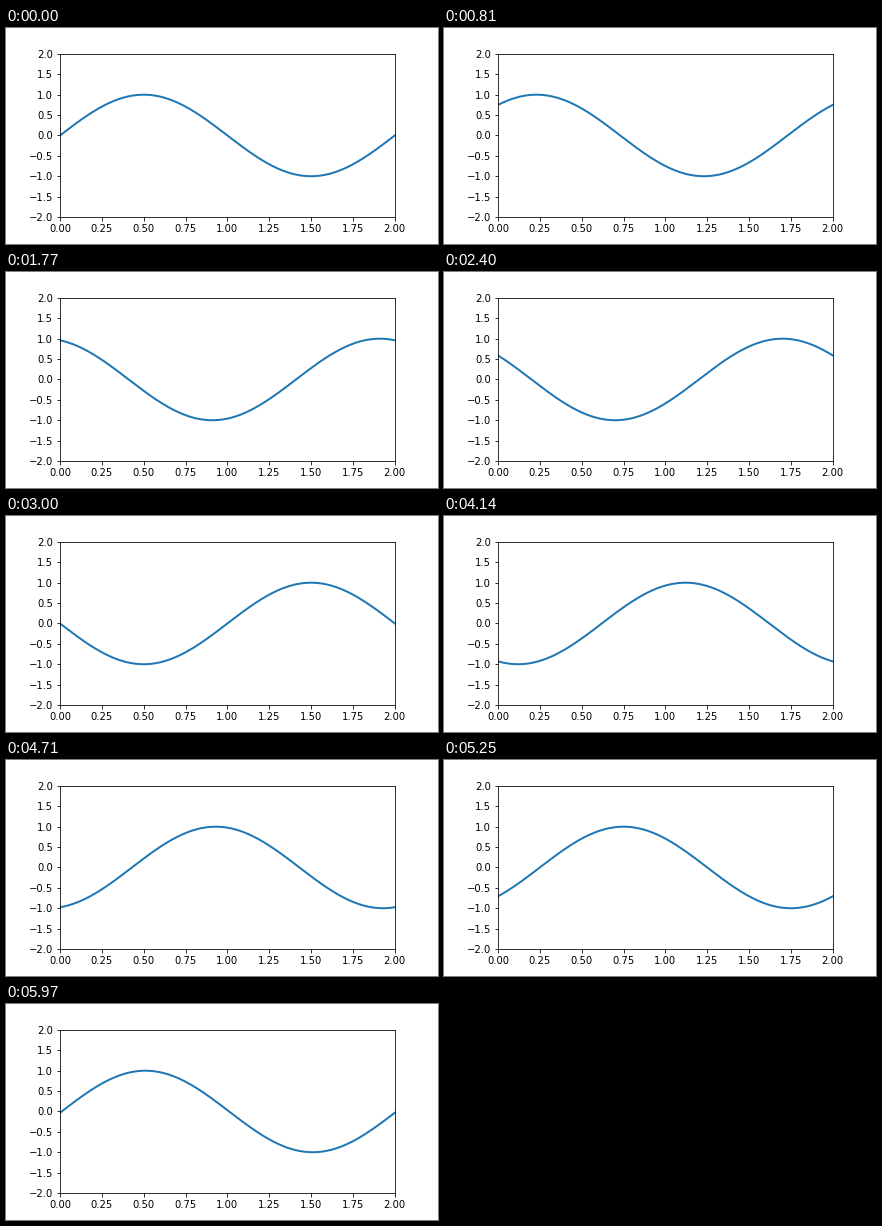
A matplotlib script for the animation above (6000 ms loop, 432 by 216 pixels).

```python
import numpy as np
import matplotlib.pyplot as plt
from matplotlib.animation import FuncAnimation

FRAMES = 200
INTERVAL = 30  # ms
SHIFT = 2 / FRAMES  # one full wavelength per loop

plt.rcParams.update({"font.family": "DejaVu Sans", "font.size": 10})

fig, ax = plt.subplots(figsize=(6, 3), dpi=72)
fig.subplots_adjust(left=0.125, right=0.9, bottom=0.125, top=0.88)
ax.set_xlim(0, 2)
ax.set_ylim(-2, 2)
ax.set_xticks(np.arange(0, 2.01, 0.25))
ax.set_yticks(np.arange(-2, 2.01, 0.5))

x = np.linspace(0, 2, 1000)
line, = ax.plot(x, np.sin(np.pi * x), color="#1f77b4", lw=2)


def update(i):
    line.set_ydata(np.sin(np.pi * (x + SHIFT * i)))
    return line,


anim = FuncAnimation(fig, update, frames=FRAMES, interval=INTERVAL,
                     repeat=True, repeat_delay=0, blit=False)
plt.show()
```
